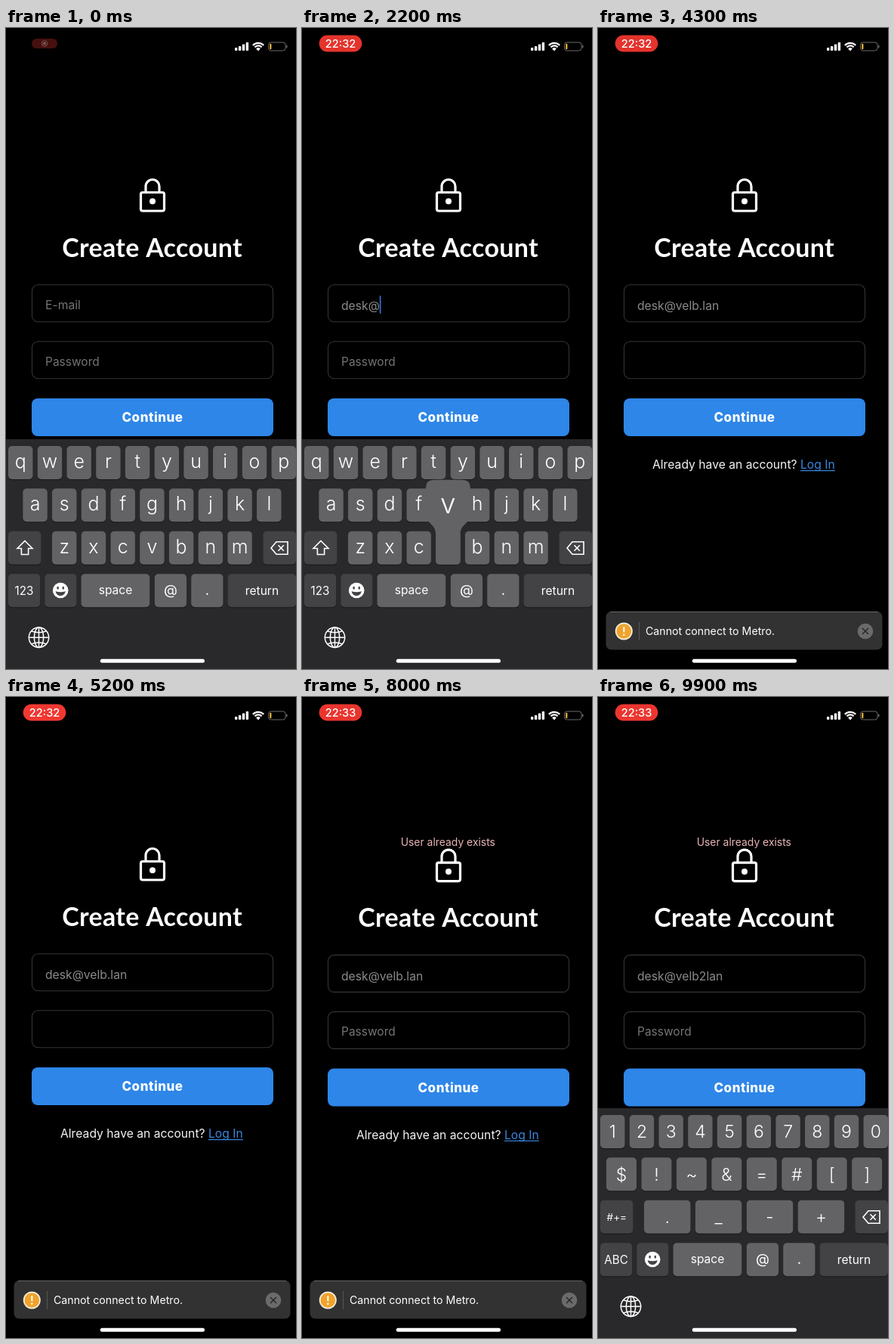
An HTML page with a canvas that plays this animation: 384x848 px, repeating every 10000 ms.

```html
<!DOCTYPE html>
<html lang="en">
<head>
<meta charset="utf-8">
<title>Create Account</title>
<style>
  html, body { margin: 0; width: 100%; height: 100%; overflow: hidden; background: #000; }
  canvas { display: block; width: 384px; height: 848px; }
</style>
</head>
<body>
<canvas id="stage"></canvas>
<script>
const W = 384, H = 848, LOOP = 10000, STEP = 100;
const canvas = document.getElementById('stage');
const ctx = canvas.getContext('2d');
const dpr = window.devicePixelRatio || 1;
canvas.width = W * dpr;
canvas.height = H * dpr;

const SANS = 'Inter, "Open Sans", sans-serif';
const KEY = '#636265', DARK_KEY = '#434245', BOARD = '#29282a';
const MAIL = 'desk@velb.lan';
// press time of each typed character
const PRESSES = [500, 900, 1200, 1500, 1900, 2200, 2400, 2600, 2800, 3000, 3400, 3600, 3800];
const T = {
  clock: 2200, secure: 4100, error: 5500, minute: 7000, blur: 7200,
  board: 8200, caret: 8900, erase: 9100, digits: 9300, two: 9500, rest: 9800
};

const clamp = v => Math.max(0, Math.min(1, v));
const easeOut = v => 1 - Math.pow(1 - clamp(v), 3);

function text(s, x, y, size, color, { weight = 400, align = 'left', font = SANS, gap = 0 } = {}) {
  ctx.font = `${weight} ${size}px ${font}`;
  ctx.letterSpacing = gap + 'px';
  ctx.textAlign = align;
  ctx.fillStyle = color;
  ctx.fillText(s, x, y);
  const w = ctx.measureText(s).width;
  ctx.letterSpacing = '0px';
  return w;
}

function box(x, y, w, h, r, fill, stroke, line = 1) {
  ctx.beginPath();
  ctx.roundRect(x, y, w, h, r);
  if (fill) { ctx.fillStyle = fill; ctx.fill(); }
  if (stroke) { ctx.strokeStyle = stroke; ctx.lineWidth = line; ctx.stroke(); }
}

function disc(x, y, r, fill) {
  ctx.beginPath();
  ctx.arc(x, y, r, 0, Math.PI * 2);
  ctx.fillStyle = fill;
  ctx.fill();
}

function poly(points, color, line, close) {
  ctx.beginPath();
  points.forEach(([x, y]) => ctx.lineTo(x, y));
  if (close) ctx.closePath();
  ctx.strokeStyle = color;
  ctx.lineWidth = line;
  ctx.stroke();
}

function drawStatus(t) {
  [4, 6, 8.5, 11].forEach((h, i) => box(303 + i * 4.9, 30 - h, 3.4, h, 1, '#fff'));

  ctx.strokeStyle = '#fff';
  ctx.lineCap = 'butt';
  ctx.lineWidth = 2.3;
  [6.2, 9.8].forEach(r => {
    ctx.beginPath();
    ctx.arc(334, 29.6, r, -Math.PI * .76, -Math.PI * .24);
    ctx.stroke();
  });
  ctx.beginPath();
  ctx.moveTo(334, 30.4);
  ctx.arc(334, 30, 3.8, -Math.PI * .76, -Math.PI * .24);
  ctx.fillStyle = '#fff';
  ctx.fill();

  box(347.5, 19, 22.5, 11, 3.2, null, '#6a6a6a');
  box(349.2, 20.8, 2.2, 7.4, 1, '#edb63c');
  box(371, 22.6, 1.4, 4, .7, '#6a6a6a');

  const grow = easeOut(t / 400);
  const glow = .5 + .5 * Math.cos((t - 1400) / 1000 * Math.PI);
  ctx.save();
  ctx.translate(51, 20.5);
  ctx.scale(.6 + .4 * grow, .6 + .4 * grow);
  ctx.globalAlpha = .3 + .7 * grow;
  box(-28.3, -11, 56.6, 22, 11, `rgb(${228 + 14 * glow},${51 + 6 * glow},${44 + 5 * glow})`);
  if (t < T.clock) {
    ctx.beginPath();
    ctx.arc(0, 0, 6.4, 0, Math.PI * 2);
    ctx.strokeStyle = '#fff';
    ctx.lineWidth = 1.5;
    ctx.stroke();
    disc(0, 0, 3.5, '#fff');
  } else {
    text(t < T.minute ? '22:32' : '22:33', 0, 5.2, 14.6, '#fff', { weight: 500, align: 'center' });
  }
  ctx.restore();
}

function drawLock() {
  ctx.lineJoin = 'round';
  box(178.5, 217.5, 31, 24.5, 2.5, null, '#fff', 3.2);
  ctx.beginPath();
  ctx.moveTo(185, 217);
  ctx.lineTo(185, 209.5);
  ctx.arc(194, 209.5, 9, Math.PI, 0);
  ctx.lineTo(203, 217);
  ctx.stroke();
  disc(194, 229.3, 4, '#fff');
}

function mailAt(t) {
  if (t >= T.two + 100) return MAIL.replace('.', '2');
  if (t >= T.erase) return MAIL.replace('.', '');
  return MAIL.slice(0, PRESSES.filter(p => t >= p + 100).length);
}

function drawCaret(t, mail) {
  const first = t >= 300 && t < T.secure;
  const again = t >= T.board && t < T.rest;
  if (!first && !again) return;
  let head = mail;
  if (t >= T.caret) head = mail.slice(0, t >= T.erase && t < T.two + 100 ? 9 : 10);
  ctx.font = `400 15.7px ${SANS}`;
  ctx.textAlign = 'left';
  box(52 + ctx.measureText(head).width, 354, 1.8, 24, .9, '#3767c8');
}

function drawForm(t) {
  const failed = t >= T.error;
  if (failed) text('User already exists', 193.3, 196.5, 13.9, '#e9b4b4', { align: 'center' });

  ctx.save();
  if (failed) ctx.translate(0, 1.6);
  drawLock();
  text('Create Account', 193.6, 302.5, 34, '#fff',
    { weight: 700, align: 'center', font: 'Lato, sans-serif', gap: .3 });

  box(34.5, 339.8, 319, 49, 8, '#000', '#343436', 1.1);
  box(34.5, 414.8, 319, 49, 8, '#000', '#343436', 1.1);
  const mail = mailAt(t);
  if (mail) text(mail, 52, 373, 15.7, '#8b8b8b');
  else text('E-mail', 52, 371.5, 15.7, '#747476');
  if (t < T.secure || t >= T.blur) text('Password', 52, 446.5, 15.5, '#747476');
  drawCaret(t, mail);

  box(34, 490, 320, 50, 8, '#2e86e8');
  text('Continue', 194, 521, 17, '#fff', { weight: 800, align: 'center', gap: .5 });

  text('Already have an account?', 72, 583, 15.7, '#f4f4f4');
  const w = text('Log In', 268, 583, 15.7, '#3a87e0');
  ctx.fillRect(268, 585, w, 1.2);
  ctx.restore();
}

function drawBanner() {
  box(10.5, 772, 366, 50.5, 7, '#323232');
  poly([[16, 772.4], [371, 772.4]], '#6c6c6c', 1);
  disc(34.3, 798, 11.5, '#f6eee0');
  disc(34.3, 798, 9.8, '#f0a32c');
  box(33.4, 792, 1.9, 7.5, .9, '#fff');
  disc(34.3, 802.8, 1.2, '#fff');
  poly([[54.5, 786], [54.5, 810]], '#565656', 1);
  text('Cannot connect to Metro.', 63, 803, 14.2, '#fff');
  disc(354, 798, 10.3, '#6b6b6b');
  poly([[350, 794], [358, 802]], '#262626', 1.5);
  poly([[358, 794], [350, 802]], '#262626', 1.5);
}

function layout(digits) {
  const keys = [];
  const row = (chars, x, y, w, pitch) =>
    [...chars].forEach((c, i) => keys.push({ c, x: x + i * pitch, y, w }));
  if (digits) {
    row('1234567890', 3, 553, 32.5, 38.72);
    row('$!~&=#[]', 11, 609.3, 40, 46.45);
    row('._-+', 61, 665.8, 61.5, 67.9);
  } else {
    row('qwertyuiop', 3, 553, 32.5, 38.72);
    row('asdfghjkl', 22.3, 609.3, 32.5, 38.72);
    row('zxcvbnm', 61, 665.8, 32.5, 38.72);
  }
  row('@.', 196.8, 722.2, 42.3, 48.4);
  return keys;
}
const LETTERS = layout(false), DIGITS = layout(true);

function keyCap(x, y, w, fill) {
  box(x, y + 1, w, 44, 5, '#171618');
  box(x, y, w, 44, 5, fill);
}

function drawPopup({ c, x, y, w }) {
  const l = x - 13.2, r = x + w + 13.2, top = y - 68, b = y + 44, re = x + w;
  ctx.beginPath();
  ctx.moveTo(l, top + 11);
  ctx.quadraticCurveTo(l, top, l + 11, top);
  ctx.lineTo(r - 11, top);
  ctx.quadraticCurveTo(r, top, r, top + 11);
  ctx.lineTo(r, y - 22);
  ctx.bezierCurveTo(r, y - 10, re, y - 10, re, y + 4);
  ctx.lineTo(re, b - 5);
  ctx.quadraticCurveTo(re, b, re - 5, b);
  ctx.lineTo(x + 5, b);
  ctx.quadraticCurveTo(x, b, x, b - 5);
  ctx.lineTo(x, y + 4);
  ctx.bezierCurveTo(x, y - 10, l, y - 10, l, y - 22);
  ctx.closePath();
  ctx.fillStyle = '#636265';
  ctx.fill();
  text(c, x + w / 2, y - 24, 37, '#fff', { weight: 300, align: 'center' });
}

function drawGlobe(x, y) {
  ctx.strokeStyle = '#fff';
  ctx.lineWidth = 1.5;
  [13.2, 6.2].forEach(rx => {
    ctx.beginPath();
    ctx.ellipse(x, y, rx, 13.2, 0, 0, Math.PI * 2);
    ctx.stroke();
  });
  poly([[x, y - 13], [x, y + 13]], '#fff', 1.5);
  poly([[x - 13, y], [x + 13, y]], '#fff', 1.5);
  [-1, 1].forEach(s => {
    ctx.beginPath();
    ctx.moveTo(x - 10, y + s * 8.6);
    ctx.quadraticCurveTo(x, y + s * 4.6, x + 10, y + s * 8.6);
    ctx.stroke();
  });
}

function drawSmiley(x, y) {
  disc(x, y, 10.3, '#fff');
  [-3.6, 3.6].forEach(d => {
    ctx.beginPath();
    ctx.ellipse(x + d, y - 3.2, 1.3, 2, 0, 0, Math.PI * 2);
    ctx.fillStyle = DARK_KEY;
    ctx.fill();
  });
  ctx.beginPath();
  ctx.moveTo(x - 6.5, y + 1.3);
  ctx.quadraticCurveTo(x, y + 3, x + 6.5, y + 1.3);
  ctx.bezierCurveTo(x + 5.5, y + 9, x - 5.5, y + 9, x - 6.5, y + 1.3);
  ctx.fill();
}

function drawBoard(t) {
  const digits = t >= T.digits;
  const keys = digits ? DIGITS : LETTERS;
  ctx.fillStyle = BOARD;
  ctx.fillRect(0, 544, W, H - 544);

  keys.forEach(k => {
    keyCap(k.x, k.y, k.w, KEY);
    const small = k.y > 700;
    const letter = k.c >= 'a' && k.c <= 'z';
    text(k.c, k.x + k.w / 2, k.y + (small ? 27.5 : letter ? 28.7 : 30.3), small ? 18.5 : letter ? 25 : 23,
      '#fff', { weight: small ? 400 : 300, align: 'center' });
  });

  const mid = { align: 'center' };
  keyCap(3, 665.8, 43.5, DARK_KEY);
  if (digits) text('#+=', 24.8, 692.5, 13.5, '#fff', mid);
  else poly([[25, 678.5], [35, 688.5], [29.6, 688.5], [29.6, 696.5], [20.4, 696.5], [20.4, 688.5], [15, 688.5]],
    '#fff', 1.6, true);

  keyCap(340.4, 665.8, 43.6, digits || t !== T.erase ? DARK_KEY : KEY);
  poly([[351, 688], [358, 679.8], [373, 679.8], [373, 696.2], [358, 696.2]], '#fff', 1.6, true);
  poly([[360.5, 684.3], [367.8, 691.7]], '#fff', 1.6);
  poly([[367.8, 684.3], [360.5, 691.7]], '#fff', 1.6);

  keyCap(3, 722.2, 42.2, DARK_KEY);
  text(digits ? 'ABC' : '123', 24, 750, 15.2, '#fff', mid);
  keyCap(51.3, 722.2, 42.2, DARK_KEY);
  drawSmiley(72.2, 744);
  keyCap(99.5, 722.2, 90.8, KEY);
  text('space', 145, 749, 15.6, '#fff', mid);
  keyCap(293.5, 722.2, 90.5, DARK_KEY);
  text('return', 339, 750, 15.6, '#fff', mid);
  drawGlobe(43.5, 806.3);

  const i = PRESSES.findIndex(p => t >= p && t < p + 150);
  const held = i >= 0 ? MAIL[i] : t >= T.two && t < T.two + 150 ? '2' : null;
  if (held) drawPopup(keys.find(k => k.c === held));
}

function draw(t) {
  ctx.setTransform(dpr, 0, 0, dpr, 0, 0);
  ctx.fillStyle = '#000';
  ctx.fillRect(0, 0, W, H);
  drawStatus(t);
  drawForm(t);
  drawBanner();
  if (t < T.secure || t >= T.board) {
    const rise = t < T.secure ? 1 : easeOut((t - T.board + STEP) / 400);
    ctx.save();
    ctx.translate(0, (1 - rise) * 304);
    drawBoard(t);
    ctx.restore();
  }
  box(124.8, 834.8, 138.2, 5, 2.5, '#fff');
}

const start = performance.now();
function tick() {
  const t = (performance.now() - start) % LOOP;
  draw(Math.floor(t / STEP) * STEP);
  requestAnimationFrame(tick);
}
tick();
</script>
</body>
</html>
```
